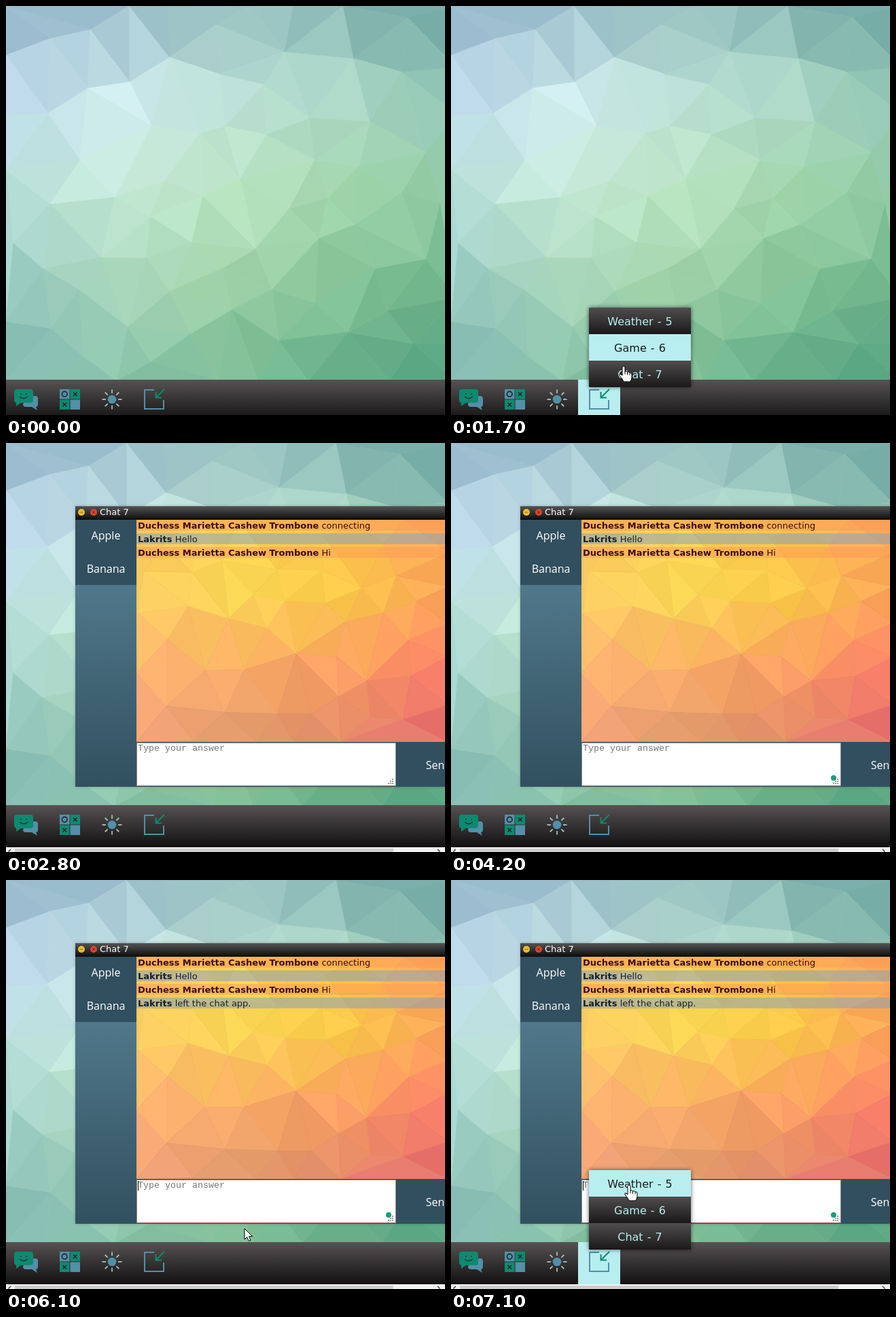
Animation, 646 px wide and 602 px high, one loop 7.2 s. Source, as an HTML page:

```html
<!DOCTYPE html>
<html lang="en">
<head>
<meta charset="utf-8">
<title>Web desktop</title>
<style>
  html, body { margin: 0; width: 100%; height: 100%; overflow: hidden; }
  svg { display: block; }
  text { font: 13px "DejaVu Sans", sans-serif; white-space: pre; }
  .name { font-weight: bold; }
  .warm { fill: #3c0a14; }
  .cool { fill: #10202e; }
  .side { font: 16px "Open Sans", sans-serif; fill: #fff; text-anchor: middle; }
  .hint { font: 13.333px "Liberation Mono", monospace; fill: #777; }
  .item text { font-size: 16px; word-spacing: 1px; text-anchor: middle; fill: #b8eef0; }
  .item rect { fill: url(#row); }
  .item.on rect { fill: #b8eef0; }
  .item.on text { fill: #1c1c1c; }
</style>
</head>
<body>
<svg width="646" height="602" viewBox="0 0 646 602">
  <defs>
    <linearGradient id="bar" x2="0" y2="1"><stop stop-color="#565253"/><stop offset="1" stop-color="#121011"/></linearGradient>
    <linearGradient id="row" x2="0" y2="1"><stop stop-color="#504d4e"/><stop offset="1" stop-color="#1a1819"/></linearGradient>
    <linearGradient id="title" x2="0" y2="1"><stop stop-color="#545454"/><stop offset="1" stop-color="#0c0c0c"/></linearGradient>
    <linearGradient id="panel" x2="0" y2="1"><stop stop-color="#50788a"/><stop offset="1" stop-color="#31505f"/></linearGradient>
    <filter id="shadow" x="-20%" y="-20%" width="140%" height="140%"><feDropShadow dx="0" dy="0" stdDeviation="3" flood-opacity=".6"/></filter>
    <filter id="halo"><feDropShadow dx="0" dy="0" stdDeviation="2" flood-opacity=".25"/></filter>
    <clipPath id="room"><path d="M192 113H646V440H192Z"/></clipPath>
  </defs>

  <g id="wall"></g>

  <g id="win">
    <path d="M102 93H660V506H102Z" fill="#31505f" filter="url(#halo)"/>
    <path d="M102 93H646V113H102Z" fill="url(#title)"/>
    <circle cx="111" cy="102" r="5" fill="#e8c030"/>
    <path d="M108.500 102h5" stroke="#8a6a10"/>
    <circle cx="129" cy="102" r="5" fill="#d8482c"/>
    <path d="M127 100l4 4m0-4l-4 4" stroke="#801c10"/>
    <text x="138" y="106" fill="#fff">Chat 7</text>
    <path d="M102 209H192V506H102Z" fill="url(#panel)"/>
    <text class="side" x="147" y="142">Apple</text>
    <text class="side" x="147" y="191">Banana</text>
    <g id="paper" clip-path="url(#room)"></g>
    <g id="log"></g>
    <path d="M192.500 441.500H573.500V504.500H192.500Z" fill="#fff" stroke="#8c8c8c"/>
    <path d="M193 504.500H573" stroke="#c07068"/>
    <text class="hint" x="194" y="453">Type your answer</text>
    <path id="caret" d="M194.500 443V457" stroke="#000"/>
    <path d="M569 494v8M566 497v5M563 500v2" stroke="#999" stroke-width="2" stroke-dasharray="2 1"/>
    <circle id="badge" cx="563" cy="493" r="4" fill="#12a07c"/>
    <text class="side" x="636.500" y="480">Send</text>
  </g>

  <g id="dock">
    <path d="M0 0H646V62H0Z" fill="url(#bar)"/>
    <path id="hot" d="M187 0H249V62H187Z" fill="#b8eef0"/>
    <path d="M30 24H43Q47 24 47 28V36Q47 40 44 40L46 45L38 40H29Q25 40 25 36Z" fill="#5290a8"/>
    <path d="M16 14H36Q40 14 40 18V30Q40 34 36 34H22L15 39V34Q12 33 12 30V18Q12 14 16 14Z" fill="#0d8a70"/>
    <path d="M20 25q6 5 12 0M22 20v2M30 20v2" fill="none" stroke="#2b3435" stroke-width="1.500"/>
    <path d="M79 14h14.500v14.500h-14.500zM94.500 29.500h14.500v14.500h-14.500z" fill="#5290a8"/>
    <path d="M94.500 14h14.500v14.500h-14.500zM79 29.500h14.500v14.500h-14.500z" fill="#0d8a70"/>
    <path d="M99 18.500l5.500 5.500m0-5.500l-5.500 5.500M83.500 34l5.500 5.500m0-5.500l-5.500 5.500" stroke="#252324" stroke-width="1.500"/>
    <circle cx="86.200" cy="21.200" r="3.800" fill="none" stroke="#252324" stroke-width="1.600"/>
    <circle cx="156" cy="29" r="6.300" fill="#5290a8"/>
    <g id="rays" stroke="#a3c4bd" stroke-width="1.800"></g>
    <path d="M218 15H204V43H232V30" fill="none" stroke="#5290a8" stroke-width="2"/>
    <path d="M233 14L221 26M220.500 18V26.500H229" fill="none" stroke="#0d8a70" stroke-width="2"/>
    <g id="menu"><path d="M203-106H353V11H203Z" filter="url(#shadow)"/></g>
  </g>

  <g id="scroll">
    <path d="M0 595H646V602H0Z" fill="#f2f2f2"/>
    <path d="M13 597H570V602H13Z" fill="#cdcdcd"/>
    <path d="M7 598L3.500 601.500M635 598L638.500 601.500" stroke="#444" stroke-width="1.500"/>
  </g>

  <g id="pointer" fill="#fff" stroke="#000" stroke-linejoin="round">
    <path id="arrow" d="M0 0V16L3.700 12.600L6.300 18.500L9 17.300L6.400 11.600H11.500Z"/>
    <g id="hand">
      <path d="M-2 2Q-2 0 0 0T2 2V8Q5 7 5.500 9Q8.500 8 9 10Q12 9.500 12 12V17Q12 20 9.500 23H0Q-1 21-2 19L-6 14Q-7 11-4 12L-2 14Z"/>
      <path d="M2 8v4M5.500 9v4M9 10.500v3" fill="none"/>
    </g>
  </g>
</svg>

<script>
const $ = id => document.getElementById(id);
const mix = (a, b, p) => a + (b - a) * p;
const clamp = (v, low, high) => Math.min(high, Math.max(low, v));
const ease = p => p * p * (3 - 2 * p);

function add(parent, tag, attrs, text = '') {
  const el = document.createElementNS('http://www.w3.org/2000/svg', tag);
  for (const key in attrs) el.setAttribute(key, attrs[key]);
  el.textContent = text;
  return parent.appendChild(el);
}

function randomFrom(seed) {
  return () => (seed = (seed * 16807) % 2147483647) / 2147483647;
}

// Bilinear colour from an even grid of tones; u and v run from 0 to 1
function toneAt(u, v, tones, shift) {
  const gx = u * (tones[0].length - 1), gy = v * (tones.length - 1);
  const col = Math.min(Math.floor(gx), tones[0].length - 2), row = Math.min(Math.floor(gy), tones.length - 2);
  const channel = (r, c, bits) => tones[r][c] >> bits & 255;
  const rgb = [16, 8, 0].map(bits => Math.round(shift + mix(
    mix(channel(row, col, bits), channel(row, col + 1, bits), gx - col),
    mix(channel(row + 1, col, bits), channel(row + 1, col + 1, bits), gx - col), gy - row)));
  return `rgb(${rgb})`;
}

// Low-poly picture: key corners plus scattered ones, joined by a Delaunay mesh
function mesh(parent, { x, y, w, h, gap, seed, keys, tones }) {
  const random = randomFrom(seed);
  const pts = [[x, y], [x + w, y], [x, y + h], [x + w, y + h], ...keys];
  for (let tries = 0; tries < 1500; tries++) {
    const px = x + w * clamp(random() * 1.2 - 0.1, 0, 1);
    const py = y + h * clamp(random() * 1.2 - 0.1, 0, 1);
    if (pts.every(([qx, qy]) => Math.hypot(px - qx, py - qy) > gap)) pts.push([px, py]);
  }
  const n = pts.length;
  for (let i = 0; i < n; i++) for (let j = i + 1; j < n; j++) for (let k = j + 1; k < n; k++) {
    const [ax, ay] = pts[i];
    const bx = pts[j][0] - ax, by = pts[j][1] - ay, cx = pts[k][0] - ax, cy = pts[k][1] - ay;
    const d = 2 * (bx * cy - by * cx);
    if (Math.abs(d) < 1) continue;
    const b2 = bx * bx + by * by, c2 = cx * cx + cy * cy;
    const ux = (cy * b2 - by * c2) / d, uy = (bx * c2 - cx * b2) / d;
    const r = Math.hypot(ux, uy) - 1e-6;
    if (pts.some(([qx, qy]) => Math.hypot(qx - ax - ux, qy - ay - uy) < r)) continue;
    const u = (ax + (bx + cx) / 3 - x) / w, v = (ay + (by + cy) / 3 - y) / h;
    const fill = toneAt(u, v, tones, random() * 10 - 5);
    add(parent, 'polygon', { points: [pts[i], pts[j], pts[k]].join(' '), fill, stroke: fill, 'stroke-width': 0.7 });
  }
}

mesh($('wall'), {
  x: 0, y: 0, w: 662, h: 552, gap: 56, seed: 11,
  keys: [[65, 48], [124, 35], [182, 112], [310, 27], [285, 187], [322, 177], [380, 115], [447, 165],
    [511, 77], [582, 97], [62, 158], [65, 291], [140, 370], [417, 298], [513, 322], [318, 386]],
  tones: [
    [0x90b3c9, 0x94b9c6, 0x97c0c0, 0x86b4b2, 0x6ba5a1],
    [0xc3ddef, 0xd3edf1, 0xc0e4da, 0xaed9c8, 0x90c5b4],
    [0xb9e2dc, 0xc6ebd8, 0xbbe5c2, 0xa2d6ab, 0x90cba3],
    [0x98cac1, 0xacdabf, 0x9fd1a6, 0x85c498, 0x6bb18a],
    [0x80b6b2, 0x88c3aa, 0x78bb95, 0x66b08b, 0x55a482]
  ]
});

mesh($('paper'), {
  x: 192, y: 113, w: 458, h: 327, gap: 46, seed: 5,
  keys: [[268, 240], [350, 334], [427, 310], [470, 235], [500, 263], [530, 350], [592, 290]],
  tones: [
    [0xfdc860, 0xfbd250, 0xfcc24e, 0xfba45a],
    [0xfdd065, 0xfbd956, 0xfbcb48, 0xfda35a],
    [0xfdb370, 0xfdae68, 0xfc9f64, 0xfb806a],
    [0xf09c78, 0xdd986c, 0xe3896a, 0xe4676e]
  ]
});

const HOST = 'Duchess Marietta Cashew Trombone', GUEST = 'Lakrits';
const lines = [[HOST, 'connecting'], [GUEST, 'Hello'], [HOST, 'Hi'], [GUEST, 'left the chat app.']]
  .map(([name, words], i) => {
    const line = add($('log'), 'g', {}), y = 113 + i * 20, cool = name === GUEST;
    add(line, 'rect', { x: 192, y, width: 454, height: 16, fill: cool ? 'rgba(128,160,190,.5)' : 'rgba(250,148,88,.45)' });
    const text = add(line, 'text', { x: 194, y: y + 13, class: cool ? 'cool' : 'warm' });
    add(text, 'tspan', { class: 'name' }, name);
    add(text, 'tspan', {}, ' ' + words);
    return line;
  });

const items = ['Weather - 5', 'Game - 6', 'Chat - 7'].map((label, i) => {
  const item = add($('menu'), 'g', { class: 'item' }), y = i * 39 - 106;
  add(item, 'rect', { x: 203, y, width: 150, height: 39 });
  add(item, 'text', { x: 278, y: y + 26 }, label);
  return item;
});

for (let angle = 0; angle < 360; angle += 45)
  add($('rays'), 'path', { d: 'M156 14.500V20', transform: `rotate(${angle} 156 29)` });

const LOOP = 7200, STEP = 100, RESTORE = 2100;

// Pointer stops as [time, x, y]
const trips = [
  [[300, 660, 420], [800, 214, 568], [1000, 212, 570], [1400, 258, 470], [1700, 254, 530], [2000, 254, 538], [2600, 660, 440]],
  [[5200, 660, 440], [6100, 351, 513], [6500, 216, 553], [7000, 258, 460], [7100, 262, 449]]
];

function pointerAt(t) {
  for (const trip of trips)
    for (let i = 1; i < trip.length; i++) {
      const [t0, x0, y0] = trip[i - 1], [t1, x1, y1] = trip[i];
      if (t < t0 || t > t1) continue;
      const p = ease((t - t0) / (t1 - t0));
      return [mix(x0, x1, p), mix(y0, y1, p)];
    }
  return [-50, -50];
}

const show = (id, on) => $(id).style.display = on ? '' : 'none';

function draw() {
  const t = Math.floor(performance.now() % LOOP / STEP) * STEP;
  const restored = t >= RESTORE, top = restored ? 533 : 550;
  const open = t >= 800 && t < RESTORE || t >= 6500;
  const [x, y] = pointerAt(t);

  $('wall').setAttribute('transform', restored ? 'scale(.98 .969)' : '');
  $('dock').setAttribute('transform', `translate(0 ${top})`);
  show('win', restored);
  show('scroll', restored);
  show('badge', t >= 3900);
  show('caret', t >= 4900 && t % 1000 < 500);
  show('hot', open);
  show('menu', open);
  lines[3].style.display = t >= 4700 ? '' : 'none';

  // The highlight trails the pointer by one step
  const [hx, hy] = pointerAt(t - STEP);
  const hovered = hx >= 203 && hx < 353 ? Math.floor((hy - top + 106) / 39) : -1;
  items.forEach((item, i) => item.classList.toggle('on', i === hovered));

  $('pointer').setAttribute('transform', `translate(${x} ${y})`);
  show('arrow', !open);
  show('hand', open);
  requestAnimationFrame(draw);
}
draw();
</script>
</body>
</html>
```
